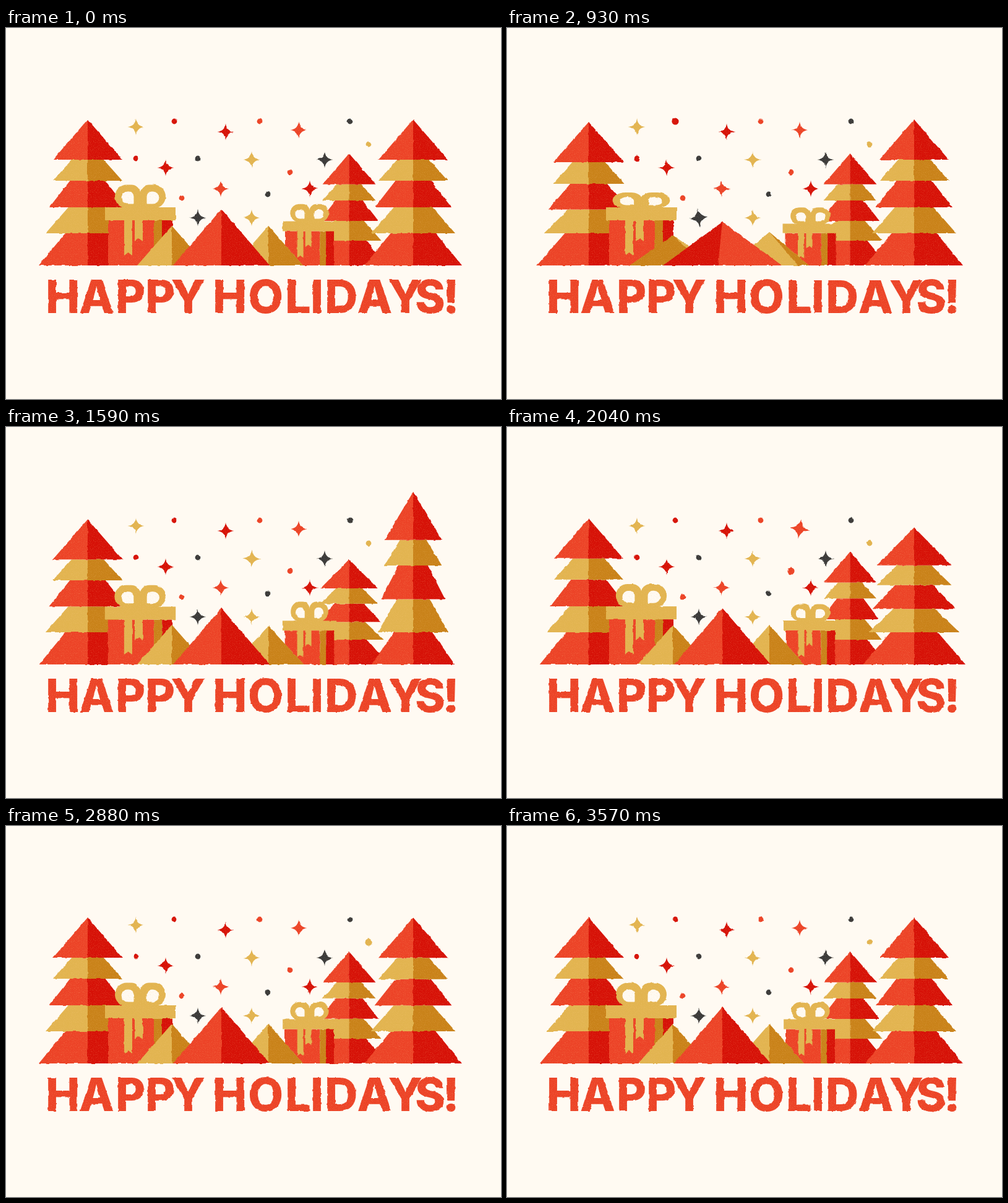
An HTML page with a canvas for the animation above (3600 ms loop, 800x600 px).

```html
<!DOCTYPE html>
<html lang="en">
<head>
<meta charset="utf-8">
<title>Happy Holidays</title>
<style>
html, body { margin: 0; width: 100%; height: 100%; overflow: hidden; background: #fffaf2; }
canvas { display: block; width: 800px; height: 600px; filter: url(#print); }
svg { position: absolute; width: 0; height: 0; }
</style>
</head>
<body>
<canvas id="stage" width="800" height="600"></canvas>
<svg aria-hidden="true">
  <filter id="print" x="0" y="0" width="100%" height="100%" color-interpolation-filters="sRGB">
    <feTurbulence id="wobble" type="fractalNoise" baseFrequency="0.11" numOctaves="2" seed="1" result="warp"/>
    <feDisplacementMap in="SourceGraphic" in2="warp" scale="3" xChannelSelector="R" yChannelSelector="G" result="rough"/>
    <feTurbulence type="fractalNoise" baseFrequency="0.75" numOctaves="2" seed="7"/>
    <feColorMatrix values="0 0 0 0 1  0 0 0 0 0.8  0 0 0 0 0.55  0.7 0 0 0 -0.36"/>
    <feComposite in2="rough" operator="atop"/>
  </filter>
</svg>
<script>
const LOOP = 3600, GROUND = 384;
const CREAM = '#fffaf2', CORAL = '#ec4327', RED = '#d61107';
const GOLD = '#e2b450', OCHRE = '#c98219', INK = '#3a3a3a';
const ctx = document.getElementById('stage').getContext('2d');
const wobble = document.getElementById('wobble');

const clamp = q => Math.min(1, Math.max(0, q));
const smooth = q => q * q * (3 - 2 * q);

// Damped swing that eases in at t = 0 and crosses zero every half period.
function swing(t, half, decay = 350) {
  if (t <= 0) return 0;
  return .47 * smooth(clamp(t / 200)) * Math.exp(-t / decay) * Math.sin(Math.PI * t / half);
}

function poly(color, ...p) {
  ctx.fillStyle = color;
  ctx.beginPath();
  for (let i = 0; i < p.length; i += 2) ctx.lineTo(p[i], p[i + 1]);
  ctx.fill();
}

function box(color, x1, y1, x2, y2) {
  ctx.fillStyle = color;
  ctx.fillRect(x1, y1, x2 - x1, y2 - y1);
}

function at(x, y, sx, sy, draw) {
  ctx.save();
  ctx.translate(x, y);
  ctx.scale(sx, sy);
  draw();
  ctx.restore();
}

const LEVELS = [-236, -171, -137, -94, -52, 0];
const HALVES = [56, 56, 62, 68, 79];

// Lower tiers swing slower; the bottom tier keeps its height.
function tree(x, size, t) {
  const s = HALVES.map((_, i) => swing(t - 250, 360 + 8 * i * i));
  const ys = LEVELS.map((y, i) => i < 4 ? y + s[i] * (1 + .1 * i) * (y + 52) : y);
  at(x, GROUND, size, size, () => {
    for (let i = 4; i >= 0; i--) {
      const w = HALVES[i] * (1 + s[i]) ** -.9, neck = i ? w * .46 : 0;
      const [light, dark] = i % 2 ? [GOLD, OCHRE] : [CORAL, RED];
      poly(light, -neck, ys[i], .5, ys[i], .5, ys[i + 1], -w, ys[i + 1]);
      poly(dark, 0, ys[i], neck, ys[i], w, ys[i + 1], 0, ys[i + 1]);
    }
  });
}

// Ring with its inner bottom corner left square.
function ring(color, x1, y1, x2, y2, round) {
  ctx.fillStyle = color;
  ctx.beginPath();
  ctx.roundRect(x1, y1, x2 - x1, y2 - y1, [round * .8, round, round, 1]);
  ctx.fill();
}

function tail(x, end) {
  poly(GOLD, x, -74, x + 13, -74, x + 13, end, x + 6.5, end - 5, x, end);
}

function gift(x, size, t) {
  const body = 1 - .4 * swing(t - 400, 265);
  const bow = 1 + 2.6 * swing(t - 480, 300);
  at(x, GROUND, size * body ** -.65, size * body, () => {
    box(CORAL, -52, -73, 22, 0);
    box(OCHRE, 22, -73, 35, 0);
    box(RED, 35, -73, 52, 0);
    tail(-26, -16);
    tail(-9, -39);
    for (const side of [-1, 1]) {
      at(0, -93.5, side * bow ** -.3, bow, () => {
        ring(GOLD, -.5, -37, 41, 1, 20);
        ring(CREAM, 10.5, -26, 30.5, -6, 10);
      });
    }
    box(GOLD, -57, -94, 57, -73);
  });
}

// The faces pass by for half a turn while the pyramid sinks and recovers.
function pyramid(x, half, height, light, dark, t) {
  const turn = 4 * smooth(clamp(t / 740));
  const k = 1 - .24 * Math.sin(Math.PI * clamp(t / 900));
  const w = half * k ** -.8, top = GROUND - height * k;
  const flip = Math.floor((turn + 1) / 2);
  const edge = x + w * (turn - 2 * flip);
  const [left, right] = flip % 2 ? [dark, light] : [light, dark];
  poly(left, x, top, x + w, GROUND, x - w, GROUND);
  poly(right, x, top, x + w, GROUND, edge, GROUND);
}

// Both lists are in the order in which the pieces pulse.
const STARS = [
  [210, 160, GOLD], [258, 226, RED], [515, 213, INK], [310, 307, INK], [355, 168, RED],
  [397, 213, GOLD], [491, 260, RED], [473, 165, CORAL], [347, 260, CORAL], [397, 307, GOLD]
];
const DOTS = [
  [284, 275, CORAL], [210, 211, RED], [272, 151, RED], [310, 211, INK], [410, 151, CORAL],
  [459, 233, CORAL], [423, 269, INK], [586, 188, GOLD], [556, 151, INK]
];

function star([x, y, color], t) {
  const q = clamp(t / 260), k = 1 + .3 * Math.sin(Math.PI * q);
  const r = 13.5, c = 1.5 * k;
  at(x, y, k, k, () => {
    ctx.rotate(-Math.PI / 2 * smooth(q));
    ctx.fillStyle = color;
    ctx.beginPath();
    ctx.moveTo(0, -r);
    ctx.quadraticCurveTo(c, -c, r, 0);
    ctx.quadraticCurveTo(c, c, 0, r);
    ctx.quadraticCurveTo(-c, c, -r, 0);
    ctx.quadraticCurveTo(-c, -c, 0, -r);
    ctx.fill();
  });
}

function dot([x, y, color], t) {
  ctx.fillStyle = color;
  ctx.beginPath();
  ctx.arc(x, y, 4.4 * (1 + .35 * Math.sin(Math.PI * clamp(t / 250))), 0, 7);
  ctx.fill();
}

const LETTERS = [...'HAPPYHOLIDAYS!'];
const CENTERS = [92, 146.5, 202, 250, 294, 362, 419.5, 473, 502.5, 542.5, 596, 645, 685.5, 719.5];

function greeting(t) {
  ctx.font = '800 74px Inter, sans-serif';
  ctx.fillStyle = CORAL;
  LETTERS.forEach((ch, i) => {
    const k = 1 - 1.7 * swing(t - 30 - i * 30, 260, 150);
    const m = ctx.measureText(ch);
    const mid = (m.actualBoundingBoxRight - m.actualBoundingBoxLeft) / 2;
    at(CENTERS[i], 460.5, k, k, () => ctx.fillText(ch, -mid, 0));
  });
}

function render(t) {
  ctx.clearRect(0, 0, 800, 600);
  STARS.forEach((s, i) => star(s, t - 173 - 237 * i));
  DOTS.forEach((d, i) => dot(d, t - 120 - 370 * i));
  tree(132, 1, t);
  gift(217, 1, t);
  tree(554.5, .767, t - 750);
  tree(658, 1, t - 1200);
  gift(490.5, .76, t - 440);
  pyramid(268, 56, 64, GOLD, OCHRE, t - 465);
  pyramid(424, 56, 64, GOLD, OCHRE, t - 730);
  pyramid(348, 78, 91, CORAL, RED, t - 570);
  greeting(t);
  wobble.setAttribute('seed', 1 + Math.floor(t / 60));
}

const began = performance.now();
function tick() {
  render((performance.now() - began) % LOOP);
  requestAnimationFrame(tick);
}
tick();
</script>
</body>
</html>
```
